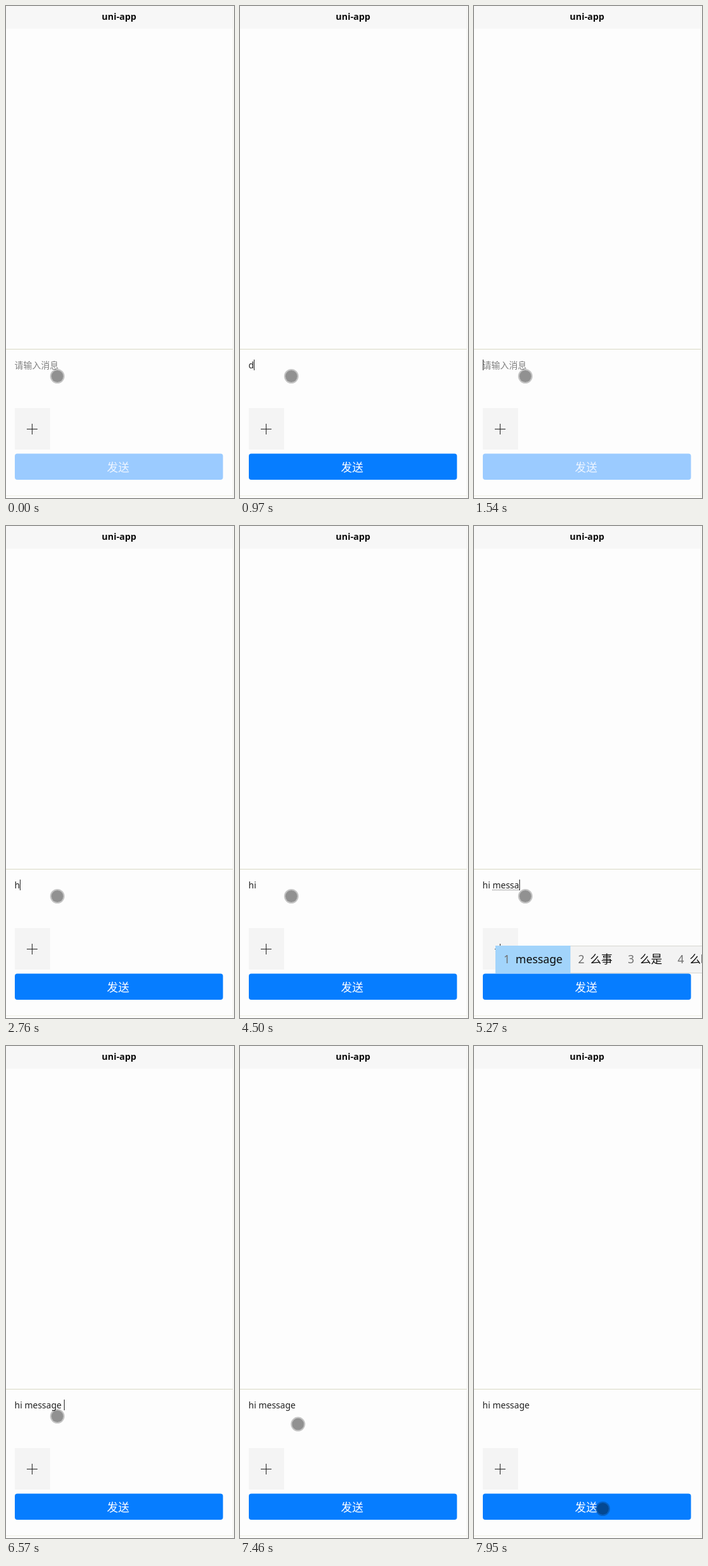
Write an HTML page that moves like this. It is 362 px wide and 782 px high and loops after 7.99 s.

```html
<!DOCTYPE html>
<html lang="zh-CN">
<head>
<meta charset="utf-8">
<title>uni-app</title>
<style>
  html, body { margin: 0; width: 100%; height: 100%; overflow: hidden; background: #fdfdfd; }
  svg { display: block; width: 362px; height: 782px; }
  text { font: 14px "Noto Sans", "Noto Sans CJK SC", "Noto Sans CJK", sans-serif; fill: #222; white-space: pre; }
  .big { font-size: 17.8px; }
  #title { font-size: 14.4px; font-weight: 700; fill: #0c0c0c; }
  #hint { fill: #808080; }
  #dot circle { mix-blend-mode: multiply; }
</style>
</head>
<body>
<svg viewBox="0 0 362 782">
  <rect width="362" height="782" fill="#fdfdfd"/>
  <rect width="360" height="36" fill="#f7f7f7"/>
  <rect x="360" width="1" height="782" fill="#f0f0ec"/>
  <text id="title" x="179.5" y="22" text-anchor="middle">uni-app</text>
  <path d="M0 545.5H360" stroke="#d8d8c4"/>
  <path d="M0 778.5H360" stroke="#eeeee2"/>

  <text id="hint" x="13.5" y="576">请输入消息</text>
  <text id="field" x="13.5" y="576"></text>
  <path id="under" stroke="#555" stroke-dasharray="1 1"/>
  <rect id="caret" y="562" width="1" height="17" fill="#222"/>

  <rect x="14" y="639" width="56" height="66" fill="#f4f4f4"/>
  <path d="M33 672.5H50M41.5 664V681" stroke="#222"/>
  <rect id="button" x="14" y="711.5" width="330.5" height="41.5" rx="4"/>
  <text id="send" class="big" x="178" y="740" text-anchor="middle">发送</text>

  <g id="popup">
    <rect x="34.5" y="667.5" width="340" height="43" fill="#f3f3f3" stroke="#d6d6d0"/>
    <rect id="pick" x="34" y="667" height="44" fill="#a2d4fb"/>
    <g id="words"></g>
  </g>

  <g id="dot">
    <circle r="10.5" fill="none" stroke="#c6c6c6" stroke-width="2"/>
    <circle r="9.5" fill="#929292"/>
  </g>
</svg>
<script>
const LOOP = 7990, BLINK = 485;
const $ = id => document.getElementById(id);

// [time, committed text, text being composed]
const keys = [
  [0, ""], [970, "d"], [1540, ""], [2680, "h"], [2920, "hi"], [4660, "hi "],
  [4790, "hi ", "m"], [4910, "hi ", "me"], [5030, "hi ", "mes"], [5150, "hi ", "mess"],
  [5230, "hi ", "messa"], [5470, "hi ", "messag"], [5680, "hi ", "message"],
  [6360, "hi message"], [6550, "hi message "], [6890, "hi message"]
];
const choices = {
  m: ["吗", "没", "么", "每", "慢", "买"],
  me: ["么", "没", "每", "美", "妹", "媒"]
};
const fullChoices = ["message", "么事", "么是", "么时"];

const field = $("field"), words = $("words");
let shown = -1, caretX = 14;

function addWord(x, str, color) {
  const el = document.createElementNS("http://www.w3.org/2000/svg", "text");
  el.setAttribute("class", "big");
  el.setAttribute("x", x);
  el.setAttribute("y", 695);
  el.style.fill = color;
  el.textContent = str;
  words.append(el);
  return el.getComputedTextLength();
}

function fillPopup(list) {
  words.replaceChildren();
  let x = 47;
  list.forEach((word, i) => {
    addWord(x, i + 1, "#707070");
    x += 19 + addWord(x + 19, word, "#0c0c0c");
    if (!i) $("pick").setAttribute("width", x + 12.5 - 34);
    x += 24.5;
  });
}

function showKey(i) {
  const [, text, compose = ""] = keys[i];
  field.textContent = text;
  const start = 13.5 + (text ? field.getComputedTextLength() : 0);
  const full = text + compose;
  field.textContent = full;
  const end = 13.5 + (full ? field.getComputedTextLength() : 0);
  caretX = Math.round(end);
  $("under").setAttribute("d", compose ? `M${Math.round(start)} 578.5H${caretX}` : "");
  $("hint").style.display = full ? "none" : "";
  $("button").setAttribute("fill", full ? "#067dff" : "#9bcbff");
  $("send").style.fill = full ? "#fff" : "#eef5ff";
  $("popup").style.display = compose ? "" : "none";
  if (compose) fillPopup(choices[compose] || fullChoices);
}

function draw(t) {
  let i = keys.length - 1;
  while (keys[i][0] > t) i--;
  if (i !== shown) showKey(shown = i);

  // The caret starts hidden and stays hidden once the pointer leaves for the button.
  const phase = Math.floor((t - keys[i][0]) / BLINK) % 2;
  const on = i ? phase === 0 && t < 7380 : phase === 1;
  $("caret").setAttribute("x", caretX);
  $("caret").style.display = on ? "" : "none";

  const p = Math.min(1, Math.max(0, (t - 7360) / 560));
  const e = p * p * (3 - 2 * p);
  $("dot").setAttribute("transform", `translate(${81.5 + 123 * e} ${588.5 + 147 * e})`);
}

function frame() {
  draw(performance.now() % LOOP);
  requestAnimationFrame(frame);
}
frame();
</script>
</body>
</html>
```
